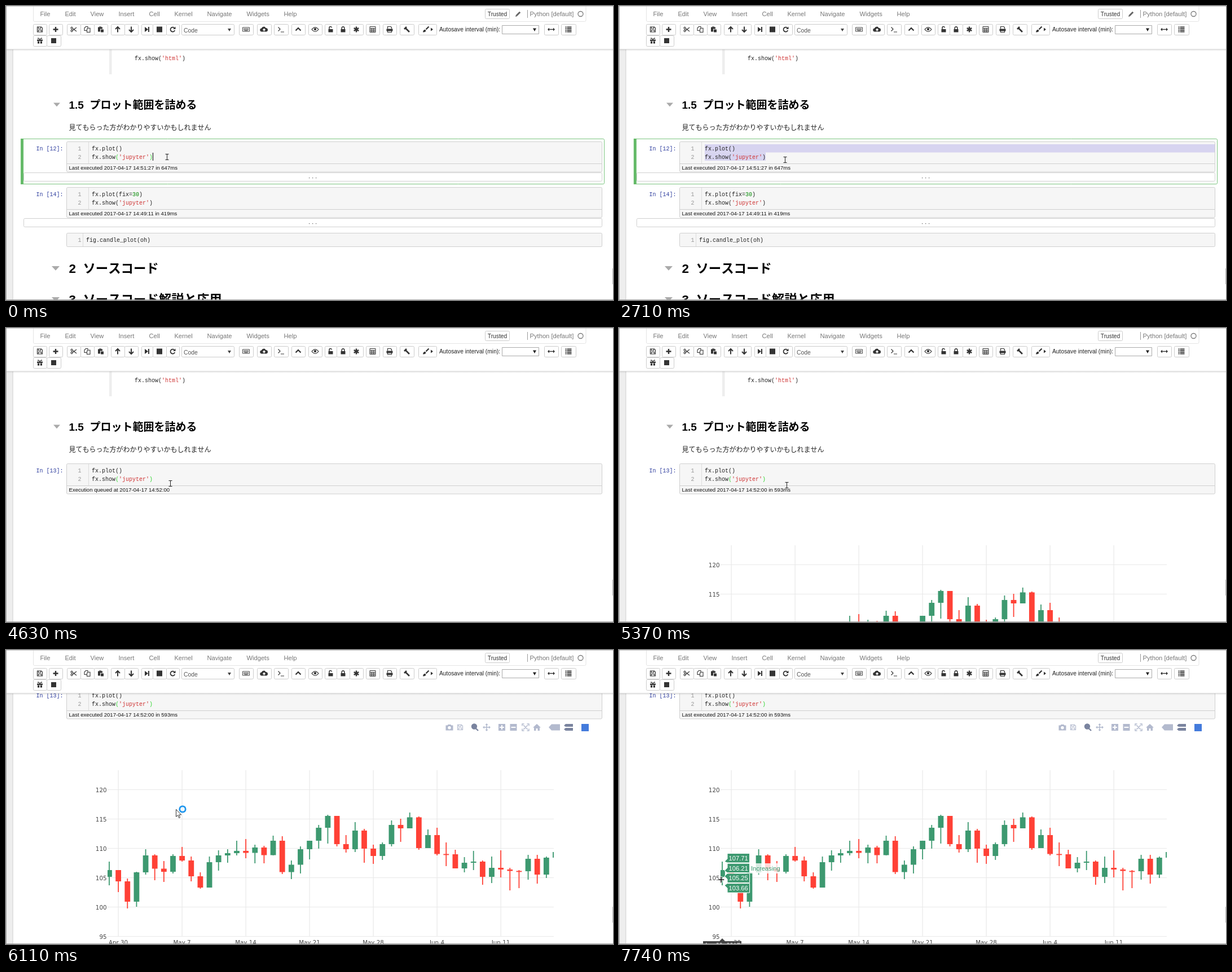
Write an HTML page with a canvas that moves like this. It is 1076 px wide and 521 px high and loops after 7.99 s.

```html
<!DOCTYPE html>
<html lang="ja">
<head>
<meta charset="utf-8">
<title>Notebook</title>
<style>
html, body { margin: 0; width: 100%; height: 100%; overflow: hidden; background: #fff; }
canvas { display: block; width: 1076px; height: 521px; }
</style>
</head>
<body>
<canvas id="stage" width="1076" height="521"></canvas>
<script>
const W = 1076, H = 521, LOOP = 7990;
const c = document.getElementById('stage').getContext('2d');

const SANS = '"Liberation Sans", Arial, "Noto Sans CJK JP", sans-serif';
const JP = '"Noto Sans CJK JP", "Noto Sans CJK", sans-serif';
const AXIS = '"DejaVu Sans", Verdana, sans-serif';
const CODE = '10px "Liberation Mono", "Courier New", monospace';

const GREEN = '#3d9970', RED = '#ff4136';
const INK = '#222', STR = '#cf3434', MATCH = '#2fd52f';

// ---------- basic helpers ----------
function box(x, y, w, h, fill, line, r = 0) {
  c.beginPath();
  c.roundRect(x, y, w, h, r);
  if (fill) { c.fillStyle = fill; c.fill(); }
  if (line) { c.strokeStyle = line; c.lineWidth = 1; c.stroke(); }
}
function rect(x, y, w, h, fill) {
  c.fillStyle = fill;
  c.fillRect(x, y, w, h);
}
function text(s, x, y, font, fill = '#000', align = 'left') {
  c.font = font;
  c.fillStyle = fill;
  c.textAlign = align;
  c.fillText(s, x, y);
}
const sans = (s, x, y, size, fill, align) => text(s, x, y, `${size}px ${SANS}`, fill, align);
function poly(points, fill) {
  c.beginPath();
  points.forEach(([x, y]) => c.lineTo(x, y));
  c.closePath();
  c.fillStyle = fill;
  c.fill();
}
function code(x, y, ...parts) {
  for (const [s, fill] of parts) {
    text(s, x, y, CODE, fill);
    x += c.measureText(s).width;
  }
}

// ---------- icons: [filled path, stroked path, stroke width] ----------
const ICONS = {
  save: ['', 'M-4.5-4.5h7l2 2v7h-9zM-2.5-4.5v3h4v-3M-2.5 4.5v-3.5h5v3.5', 1.2],
  plus: ['', 'M-4.5 0h9M0-4.5v9', 2.5],
  cut: ['', 'M-2-2L5 3.5M-2 2L5-3.5M-5-2.5a1.6 1.6 0 1 0 3.2 0a1.6 1.6 0 1 0-3.2 0M-5 2.5a1.6 1.6 0 1 0 3.2 0a1.6 1.6 0 1 0-3.2 0', 1.1],
  copy: ['', 'M-.5 2h-4.5v-4.5l2.5-2.5h3.5v3M-.5-.5l2-1.8h3.5v7.3h-5.5z', 1.1],
  paste: ['M-5-4h8v3h-4v5h-4zM0 0h5v5h-5z', 'M-3-4.5h4', 1.2],
  up: ['', 'M0 5v-9M-4-.5l4-4 4 4', 2],
  down: ['', 'M0-5v9M-4 .5l4 4 4-4', 2],
  step: ['M-4-4.5l6 4.5-6 4.5zM2-4.5h2v9h-2z', '', 1],
  stop: ['M-5-5h10v10h-10z', '', 1],
  redo: ['M5-5v4.5h-4.5z', 'M3.8 1.5a4 4 0 1 1-1-4.3', 1.8],
  keys: ['', 'M-6-3.5h12v7h-12zM-4.5-1.2h9M-4.5.6h9M-3 2.2h6', .9],
  cloud: ['M-4 4a3 3 0 0 1-.5-6a4 4 0 0 1 7.5-.5a3.3 3.3 0 0 1 1 6.5zM0-2l-3 3h2v2h2v-2h2z', '', 1],
  term: ['', 'M-5-4l3.5 3.5-3.5 3.5M-.5 4.5h6', 1.2],
  chev: ['', 'M-4.5 2l4.5-4.5 4.5 4.5', 2.2],
  eye: ['M-2.2-.4a2.2 2.2 0 1 0 4.4 0a2.2 2.2 0 1 0-4.4 0', 'M-6 0q6-7.5 12 0q-6 7.5-12 0z', 1.2],
  unlock: ['M-4-.5h8v5.5h-8z', 'M-2.5-.5v-2a2.2 2.2 0 0 1 4.4-.5', 1.5],
  lock: ['M-4-.5h8v5.5h-8z', 'M-2.3-.5v-2a2.3 2.3 0 0 1 4.6 0v2', 1.5],
  star: ['', 'M0-5v10M-4.3-2.5l8.6 5M-4.3 2.5l8.6-5', 2.5],
  calc: ['', 'M-5-5h10v10h-10zM-5-2h10M-1.7-2v7M1.7-2v7M-5 .5h10M-5 2.8h10', 1],
  print: ['M-5.5-1h11v4h-11z', 'M-3.5-1v-4h5.5l1.5 1.5v2.5M-3.5 1.5v3.5h7v-3.5', 1.2],
  gavel: ['M-1.8-5.5l4.300 4.300-1.500 1.500-4.300-4.300zM-4.500-2.500l4.300 4.300-1.500 1.500-4.300-4.300z'.replace(/00/g, ''), 'M-1.5-1.500l6.5 6', 2.4],
  brush: ['M-8 5q1-6 5-4q1.5 4-5 4zM6-3l4 3-4 3z', 'M-2.5 0l5-5', 2.3],
  wide: ['M-6.5 0l3-3v6zM6.5 0l-3-3v6z', 'M-5 0h10', 1.4],
  list: ['', 'M-5.5-4.2h2M-2.5-4.2h8M-5.5-1.4h2M-2.5-1.4h8M-5.5 1.4h2M-2.5 1.4h8M-5.5 4.2h2M-2.5 4.2h8', 1.7],
  gift: ['M-5-2h10v2.5h-10zM-4 1h3.2v4h-3.2zM.8 1h3.2v4h-3.2z', 'M0-2q-3.5-4.5-3.5-1.2M0-2q3.5-4.5 3.5-1.2', 1.2],
  square: ['M-4.5-4.5h9v9h-9z', '', 1],
  pencil: ['M-5 5l1-3.5 2.5 2.5z', 'M-2.8 2.8l6-6', 3],
  camera: ['M-6.5-3.5h3l1.2-1.5h4.6l1.2 1.5h3v9h-13zM-2.7.8a2.7 2.7 0 1 0 5.4 0a2.7 2.7 0 1 0-5.4 0z', '', 1],
  zoom: ['M-5-1.5a4 4 0 1 0 8 0a4 4 0 1 0-8 0', 'M-5-1.5a4 4 0 1 0 8 0a4 4 0 1 0-8 0M2 2l4 4', 2.4],
  pan: ['M0-7l2.5 3h-5zM0 7l2.5-3h-5zM-7 0l3-2.5v5zM7 0l-3-2.5v5z', 'M-5 0h10M0-5v10', 1.5],
  more: ['M-6-6h12v12h-12zM-1-4h2v3h3v2h-3v3h-2v-3h-3v-2h3z', '', 1],
  less: ['M-6-6h12v12h-12zM-4-1h8v2h-8z', '', 1],
  fit: ['', 'M-6-2.5v-3.5h3.5M6-2.5v-3.5h-3.5M-6 2.5v3.5h3.5M6 2.5v3.5h-3.5M-4-4l8 8M-4 4l8-8', 1.5],
  home: ['M-7 .5l7-6.5 7 6.5h-2v5.5h-3.5v-4h-3v4h-3.5v-5.5z', '', 1],
  tag: ['M-10 0l5-5.5h15v11h-15z', '', 1],
  tags: ['M-8-3l3-3h13v5h-13zM-8 3.5l3-2.5h13v5h-13z', '', 1]
};
ICONS.gavel = ['', 'M-4.5-.5l4-4M-2-2l6.5 6.5', 2.7];

function icon(name, x, y, color = '#333') {
  const [fill, line, width] = ICONS[name];
  c.save();
  c.translate(x, y);
  c.fillStyle = c.strokeStyle = color;
  c.lineWidth = width;
  if (fill) c.fill(new Path2D(fill), 'evenodd');
  if (line) c.stroke(new Path2D(line));
  c.restore();
}

// ---------- header ----------
const MENU = [['File', 61], ['Edit', 105], ['View', 150], ['Insert', 200], ['Cell', 254],
  ['Kernel', 299], ['Navigate', 357], ['Widgets', 427], ['Help', 493]];
const BUTTONS = [['save', 48, 72], ['plus', 76, 100], ['cut', 108, 132], ['copy', 132, 156],
  ['paste', 156, 180], ['up', 186, 210], ['down', 210, 234], ['step', 240, 260],
  ['stop', 260, 284], ['redo', 284, 307], ['keys', 413, 438], ['cloud', 445, 470],
  ['term', 475, 500], ['chev', 506, 530], ['eye', 536, 560], ['unlock', 565, 586],
  ['lock', 586, 609], ['star', 609, 633], ['calc', 638, 662], ['print', 668, 692],
  ['gavel', 698, 723], ['brush', 731, 763], ['wide', 954, 979], ['list', 984, 1010]];

function button(name, x, end, y, h) {
  box(x + .5, y + .5, end - x, h, '#fff', '#ccc', 2);
  icon(name, (x + end) / 2, y + h / 2);
}
function header(editing, busy) {
  rect(0, 0, W, 77, '#fff');
  const shade = c.createLinearGradient(0, 76, 0, 80);
  shade.addColorStop(0, 'rgba(80,80,80,.22)');
  shade.addColorStop(1, 'rgba(80,80,80,0)');
  rect(0, 76, W, 4, shade);

  c.strokeStyle = '#e4e4e4';
  c.lineWidth = 1;
  c.stroke(new Path2D('M48.5 0v25q0 2.5 2 2.5h975q2.5 0 2.5-2.5v-25'));
  MENU.forEach(([s, x]) => sans(s, x - .6, 18, 11.2, '#777'));
  box(849.5, 5.5, 43, 17, '#fff', '#ccc', 2);
  sans('Trusted', 871, 17.5, 10.3, '#333', 'center');
  if (editing) icon('pencil', 908, 14, '#666');
  rect(924, 7, 1, 14, '#999');
  sans('Python [default]', 928.5, 18, 11.2, '#777');
  c.beginPath();
  c.arc(1018.5, 14, 4.5, 0, 7);
  c.strokeStyle = c.fillStyle = '#777';
  c.lineWidth = 1.3;
  c.stroke();
  if (busy) c.fill();

  BUTTONS.forEach(([name, x, end]) => button(name, x, end, 32, 19));
  box(311.5, 32.5, 93, 19, '#fff', '#ccc', 2);
  sans('Code', 315, 46.5, 10.4, '#555');
  poly([[393, 40], [399, 40], [396, 45]], '#444');
  sans('Autosave interval (min):', 768, 45, 10.3, '#222');
  box(879.5, 34.5, 65, 15, '#fff', '#aaa');
  poly([[934, 39.5], [940, 39.5], [937, 45]], '#222');
  button('gift', 48, 72, 52, 19);
  button('square', 72, 97, 52, 19);
}

// ---------- notebook ----------
function fold(x, y, w) {
  poly([[x, y], [x + w, y], [x + w / 2, y + w * .56]], '#aaa');
}
function heading(s, y, size) {
  text(s, 111.5, y, `bold ${size}px ${SANS}`);
}
function prompt(s, y) {
  code(101.5 - 6 * s.length, y, [s, '#303f9f']);
}
function collapsed(y) {
  box(31.5, y + .5, 1025, 15, '#fff', '#d0d0d0', 2);
  for (const x of [537, 543, 549]) rect(x, y + 9, 1.2, 1.2, '#555');
}
function cell(y, label, status) {
  prompt(label, y + 16);
  box(107.5, y + .5, 949, 53.5, '#f6f6f6', '#cfcfcf', 2);
  rect(146, y + 1, 1, 38, '#ddd');
  rect(108, y + 39, 948, 1, '#cfcfcf');
  code(127.5, y + 16, ['1', '#999']);
  code(127.5, y + 30.6, ['2', '#999']);
  sans(status, 111.5, y + 50, 9.57, '#111');
}
function frame(y, bar, line) {
  box(27.5, y + .5, 1033, 80, null, line, 2);
  rect(26, y, 5, 81, bar);
}
function show(x, y, s, paren = INK) {
  code(x, y, ['fx.show', INK], ['(', paren], [`'${s}'`, STR], [')', paren]);
}

// drag selection runs from the end of line two back to the pointer
function selection(p) {
  const x = Math.max(152, 152 + Math.round((p.x - 152) / 6) * 6);
  const upper = p.y < 259.5;
  if (upper) rect(x, 245, 1056 - x, 14.5, '#d7d4f0');
  const from = upper ? 152 : Math.min(x, 260);
  rect(from, 259.5, 260 - from, 14.5, '#d7d4f0');
}

// ---------- chart ----------
const CLOSE = [390, 410, 446, 394, 364, 387.5, 393, 365, 373, 401, 421, 376, 364, 360, 356, 359.5, 350,
  363.5, 338, 393.5, 380.5, 353, 338, 315, 294, 344, 353, 320, 352, 365, 344, 310, 316, 296.5, 351, 328,
  361.5, 362, 387, 377, 375, 402, 386, 389, 391.5, 392, 370, 398, 368, 358];
const HIGH = [375, 390, 405, 393, 353, 362, 374, 362, 349, 366, 394, 366, 355, 353, 338, 335, 345,
  347, 329, 330, 373, 348, 338, 310, 292, 294, 328, 305, 317, 345, 341, 302, 299, 288, 295, 318,
  315, 341, 354, 367, 356, 373, 366, 355, 386, 390, 363, 363, 366, 358];
const LOW = [417, 429, 458, 455, 398, 408, 411, 396, 375, 410, 423, 421, 391, 377, 364, 369, 378,
  378, 364, 397, 406, 396, 371, 352, 343, 348, 359, 358, 377, 379, 372, 348, 340, 316, 354, 351,
  364, 383, 387, 394, 390, 416, 413, 403, 426, 422, 407, 414, 404, 370];
const DATES = ['Apr 30', 'May 7', 'May 14', 'May 21', 'May 28', 'Jun 4', 'Jun 11'];
const STEP = 113 / 7;

function chart() {
  for (let i = 0; i < 6; i++) {
    const y = 247 + i * 52;
    rect(180, y, 791, 1, '#e9e9e9');
    text(String(120 - 5 * i), 178.5, y + 5, `10.3px ${AXIS}`, '#444', 'right');
  }
  DATES.forEach((s, i) => {
    const x = 199 + 113 * i;
    rect(x - .5, 213, 1.2, 295, '#e9e9e9');
    text(s, x, 522, `10.3px ${AXIS}`, '#444', 'center');
  });
  c.save();
  c.beginPath();
  c.rect(180, 213, 791, 295);
  c.clip();
  CLOSE.forEach((close, i) => {
    const x = 183 + i * STEP, open = i ? CLOSE[i - 1] : 402;
    const color = close < open ? GREEN : RED;
    rect(x - .9, HIGH[i], 1.8, LOW[i] - HIGH[i], color);
    rect(x - 4.9, Math.min(open, close), 9.8, Math.max(1.8, Math.abs(open - close)), color);
  });
  c.restore();
}
function modebar() {
  const light = '#b3bace', dark = '#7a849f';
  const items = [['camera', 786], ['save', 805], ['zoom', 831, dark], ['pan', 852], ['more', 879],
    ['less', 899.5], ['fit', 921], ['home', 941], ['tag', 972], ['tags', 997, dark]];
  items.forEach(([name, x, color = light]) => icon(name, x, 137, color));
  rect(1020, 131, 13, 13, '#447bdc');
}
function hover() {
  rect(232, 378, 56, 18, 'rgba(255,255,255,.8)');
  sans('Increasing', 234, 391, 11.2, GREEN);
  [['107.71', 375], ['106.21', 391], ['105.25', 401], ['103.66', 417]].forEach(([s, tip], i) => {
    const y = 360.5 + i * 17.7, b = y + 16.5;
    c.beginPath();
    [[187, tip], [192, Math.min(tip + 5, b)], [192, b], [231.5, b], [231.5, y], [192, y],
      [192, Math.max(tip - 5, y)]].forEach(([px, py]) => c.lineTo(px, py));
    c.closePath();
    c.fillStyle = GREEN;
    c.fill();
    c.strokeStyle = '#fff';
    c.lineWidth = 1;
    c.stroke();
    sans(s, 194.5, y + 12.3, 11.2, '#fff');
  });
  poly([[149, 516], [178, 516], [183, 511], [188, 516], [217, 516], [217, 533], [149, 533]], '#444');
  sans('Apr 29, 2017', 183, 527, 11.2, '#fff', 'center');
}

// ---------- pointer ----------
const POINTER = [
  [0, 285, 267, beam], [150, 281, 267, beam], [290, 271, 268, beam], [430, 261, 268, beam],
  [570, 246, 267, beam], [710, 218, 265, beam], [850, 188, 261, beam], [990, 158, 254, beam],
  [1130, 136, 246, arrow], [1280, 134, 245, arrow], [1430, 137, 244, arrow], [1550, 129, 237, arrow],
  [1700, 138, 246, arrow], [1850, 235, 264, beam], [2000, 300, 271, beam], [2280, 298, 270, beam],
  [2430, 295, 272, beam], [2710, 294, 272, beam], [3000, 293, 273, beam], [3270, 291.5, 275, beam],
  [5370, 297, 278, beam], [5590, 300, 281, waiting], [5730, 301, 282, waiting], [6680, 299, 286, cross],
  [6820, 285, 290, cross], [6950, 264, 300, cross], [7080, 243, 316, cross], [7220, 221, 340, cross],
  [7350, 203, 367, cross], [7490, 189, 393, cross], [7620, 182, 409, cross], [7740, 181, 407, cross]];

function beam(x, y) {
  c.strokeStyle = '#222';
  c.lineWidth = 1;
  x = Math.floor(x) + .5;
  c.beginPath();
  c.moveTo(x, y - 5); c.lineTo(x, y + 5);
  for (const d of [-5, 5]) { c.moveTo(x - 3, y + d + .5); c.lineTo(x + 3, y + d + .5); }
  c.stroke();
}
function arrow(x, y, k = .78) {
  c.save();
  c.translate(x + .5, y + .5);
  c.scale(k, k);
  const p = new Path2D('M0 0v13l3-2.8 2.2 5 2-1-2.2-4.7h4.2z');
  c.fillStyle = '#fff';
  c.strokeStyle = '#333';
  c.lineWidth = 1;
  c.fill(p);
  c.stroke(p);
  c.restore();
}
function waiting(x, y) {
  arrow(x, y, 1);
  c.beginPath();
  c.arc(x + 12, y, 5.2, 0, 7);
  c.strokeStyle = '#1e96ee';
  c.lineWidth = 2.8;
  c.stroke();
}
function cross(x, y) {
  for (const [color, w, r] of [['#fff', 3.4, 6], ['#111', 1.6, 5.3]]) {
    c.strokeStyle = color;
    c.lineWidth = w;
    c.beginPath();
    c.moveTo(x - r, y); c.lineTo(x + r, y);
    c.moveTo(x, y - r); c.lineTo(x, y + r);
    c.stroke();
  }
}
function pointerAt(t) {
  const [, x, y, draw] = POINTER.findLast(k => k[0] <= t);
  return { x, y, draw };
}

// ---------- timeline ----------
const SCROLL = [[0, 0], [5590, 58], [5730, 86], [5950, 144], [6110, 172]];

function draw(t) {
  const scroll = SCROLL.findLast(k => k[0] <= t)[1];
  const p = pointerAt(t);
  const ran = t >= 4070, done = t >= 4630, plotted = t >= 4910;
  const selecting = t >= 430 && t < 2850;
  const caret = t < 430 || (t >= 3000 && t < 3270) || (t >= 3770 && !ran);

  rect(0, 0, W, H, '#fff');
  rect(0, 77, 13, H, '#eee');
  rect(11, 77, 2, H, '#e2e2e2');

  c.save();
  c.translate(0, -scroll);
  rect(183, 70, 4.5, 51, '#eee');
  show(228, 95.5, 'html');
  fold(84, 171.5, 12);
  heading('1.5\u00a0\u00a0プロット範囲を詰める', 182, 19);
  text('見てもらった方がわかりやすいかもしれません', 111.5, 219.5, `12px ${JP}`, INK);

  if (!ran) frame(235, '#66bb6a', '#7cc580');
  const status = plotted ? 'Last executed 2017-04-17 14:52:00 in 593ms'
    : ran ? 'Execution queued at 2017-04-17 14:52:00'
    : 'Last executed 2017-04-17 14:51:27 in 647ms';
  cell(240, done ? 'In [13]:' : ran ? 'In [*]:' : 'In [12]:', status);
  if (selecting) selection(t < 1130 ? p : { x: 0, y: 0 });
  code(152, 256, ['fx.plot()', INK]);
  show(152, 270.6, 'jupyter', selecting ? INK : MATCH);
  if (caret) rect(260, 260, 1, 14, '#000');

  if (!done) {
    collapsed(295);
    if (ran) frame(316, '#42a5f5', '#ababab');
    cell(321, 'In [14]:', 'Last executed 2017-04-17 14:49:11 in 419ms');
    code(152, 337, ['fx.plot(fix=', INK], ['30', '#080'], [')', INK]);
    show(152, 351.6, 'jupyter');
    collapsed(376);
    box(107.5, 402.5, 949, 24, '#f6f6f6', '#cfcfcf', 2);
    rect(136, 403, 1, 23, '#ddd');
    code(127.5, 418, ['1', '#999']);
    code(142, 418, ['fig.candle_plot(oh)', INK]);
    fold(81, 461, 14);
    heading('2\u00a0\u00a0ソースコード', 473, 22.4);
    fold(81, 516, 14);
    heading('3\u00a0\u00a0ソースコード解説と応用', 527.5, 22.4);
  }
  if (plotted) {
    c.translate(0, 172);
    chart();
    if (t >= 6110) modebar();
    if (t >= 7490) hover();
  }
  c.restore();

  header(!ran, ran && !done);
  rect(1075, (done ? 446 : 465) + scroll * .053, 1, 28, '#bbb');
  rect(0, 0, W, 1, '#c8c8c8');
  rect(0, 0, 1, H, '#a8a8a8');
  rect(0, H - 1, W, 1, '#a8a8a8');
  p.draw(p.x, p.y);
}

function tick() {
  draw(performance.now() % LOOP);
  requestAnimationFrame(tick);
}
tick();
</script>
</body>
</html>
```
